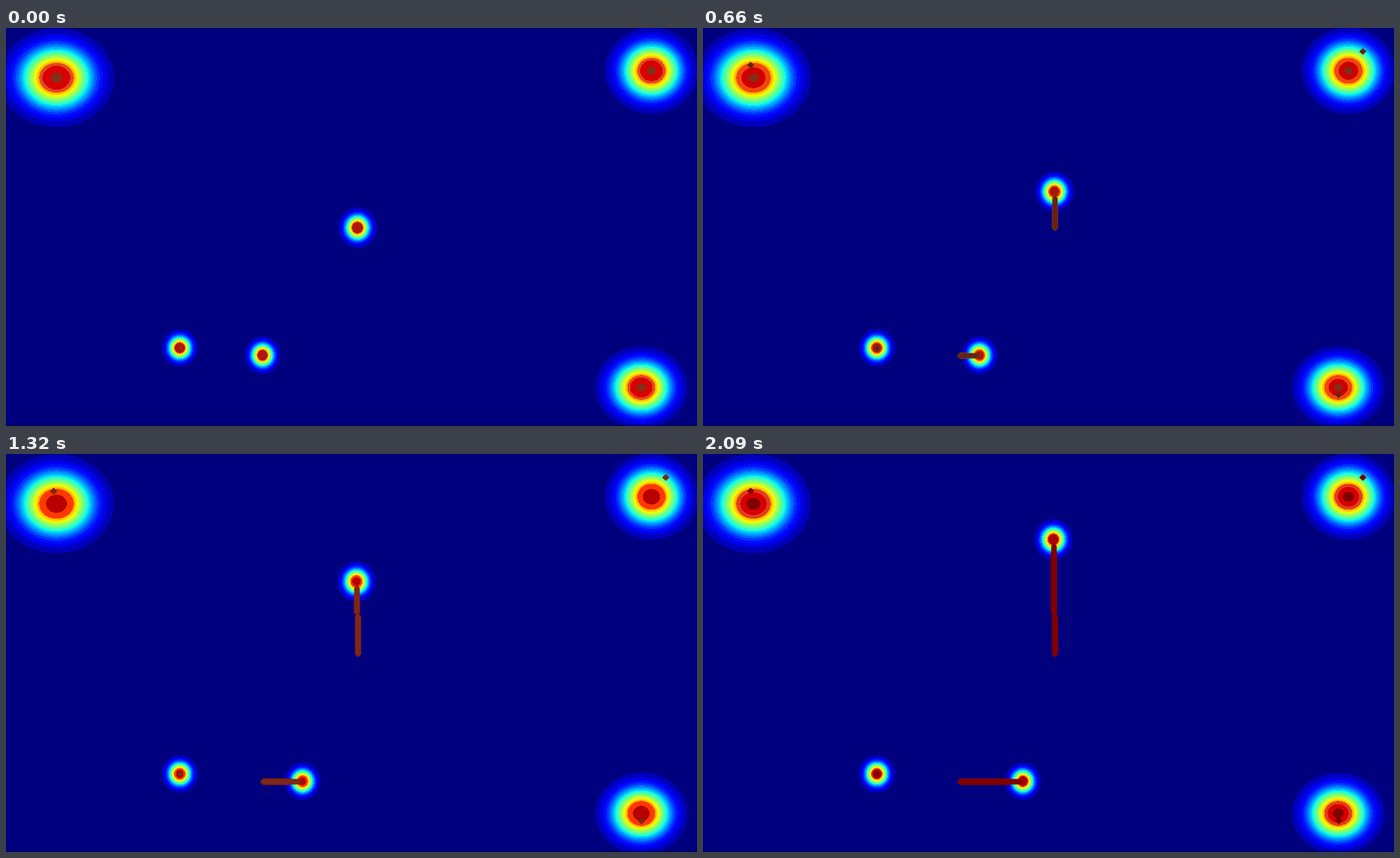
A matplotlib script for the animation above (2200 ms loop, 986 px wide and 568 px high).

```python
import numpy as np
import matplotlib.pyplot as plt
from matplotlib.animation import FuncAnimation
from matplotlib.colors import to_rgb
from matplotlib.patches import Polygon

W, H, DPI = 986, 568, 100
FRAMES, STEP_MS = 20, 110
BANDS = 24
SPREAD = np.sqrt(2 * np.log(BANDS))  # radius of the lowest band, in sigmas

# x, y, rx, ry
HOTSPOTS = [(72, 71, 82, 70.5), (921, 61, 66.5, 61.5), (906.5, 513, 66, 58.5)]
STILL = (248, 456.5, 26, 27)
MARKS = [(68, 53), (941.5, 33.5), (907, 523.5), (248.5, 457)]

# time step, core, core level, red, red level, orange, trail, trail edge
TONES = [
    (0, "#80301c", .971, "#d80000", .832, "#e64820", "#7a3018", "#7a3018"),
    (4, "#80301c", .980, "#d00000", .876, "#ff4600", "#733018", "#733018"),
    (9, "#78321a", .976, "#c80000", .860, "#e24820", "#501010", "#702c18"),
    (12, "#b80000", .950, "#b80000", .900, "#ff3800", "#7d2818", "#801c10"),
    (14, "#5a1010", .988, "#c80000", .876, "#ff3800", "#5a1010", "#5a1010"),
    (17, "#800000", .955, "#dc0000", .848, "#ff4600", "#800000", "#800000"),
    (19, "#800000", .955, "#d60000", .848, "#e23c1c", "#800000", "#800000"),
]


def flatten(row):
    return np.hstack([to_rgb(v) if isinstance(v, str) else v for v in row[1:]])


KEY_TIMES = [row[0] for row in TONES]
KEY_TONES = np.array([flatten(row) for row in TONES])


def tones_at(i):
    t = [np.interp(i, KEY_TIMES, col) for col in KEY_TONES.T]
    return t[:3], t[3], t[4:7], t[7], t[8:11], t[11:14], t[14:17]


yy, xx = np.mgrid[:H, :W] + 0.5
jet = plt.get_cmap("jet")


def bell(x, y, rx, ry):
    r2 = ((xx - x) / rx) ** 2 + ((yy - y) / ry) ** 2
    return np.exp(-0.5 * SPREAD ** 2 * r2)


def peak(spots):
    return np.max([bell(*s) for s in spots], axis=0)


big = peak(HOTSPOTS)
still = bell(*STILL)


def climber(i):
    y = 285 - 8.58 * i
    return (501.5 if y > 228 else 500), y


def runner(i):
    return 366 + 4.76 * i, 467


def heat(i, tones):
    core, core_at, red, red_at, orange = tones[:5]
    small = np.max([still, bell(*climber(i), 27.5, 29), bell(*runner(i), 25.5, 27)], axis=0)
    level = np.maximum(big, small)
    band = np.floor(level * BANDS)
    img = jet((band + 0.3) / BANDS)[..., :3]
    img[band < 1] = 0, 0, 0.5
    img[level > 0.75] = orange
    img[big > red_at] = red
    img[big > core_at] = core
    img[small > red_at - 0.03] = (np.array(core) + red) / 2
    img[-2:] = img[-2:] * 0.75
    return img


def bar(c, a, b, half, upright):
    """Bar along one axis with pointed ends."""
    tip = min(4, (b - a) / 2)
    pts = [(c, a), (c + half, a + tip), (c + half, b - tip),
           (c, b), (c - half, b - tip), (c - half, a + tip)]
    return pts if upright else [p[::-1] for p in pts]


def trails(i):
    shapes = [bar(x, y - 4.8, y + 4.8, 4.6, True) for x, y in MARKS]
    head = climber(i)[1]
    for top, half in ((head + 5, 3.9), (head + 14, 4.5)):
        if top < 282:
            shapes.append(bar(502.3, max(top, 227), 290, half, True))
        if top < 222:
            shapes.append(bar(500.8, top, 231, half, True))
    right = runner(i)[0] + 1
    for end, half in ((right, 3.9), (right - 15, 4.8)):
        if end > 370:
            shapes.append(bar(467.7, 362.5, end, half, False))
    return shapes


fig = plt.figure(figsize=(W / DPI, H / DPI), dpi=DPI)
ax = fig.add_axes([0, 0, 1, 1])
ax.axis("off")
picture = ax.imshow(np.zeros((H, W, 3)), extent=(0, W, H, 0),
                    interpolation="nearest", aspect="auto")
ax.set(xlim=(0, W), ylim=(H, 0))


def draw(i):
    tones = tones_at(i)
    picture.set_data(np.clip(heat(i, tones), 0, 1))
    for patch in list(ax.patches):
        patch.remove()
    if i > 0:
        fill, edge = tones[5:]
        shapes = trails(i)
        # Edges first, so overlapping bars share one outline
        for pts in shapes:
            ax.add_patch(Polygon(pts, fc=edge, ec="none"))
        for pts in shapes:
            pts = np.array(pts)
            mid = (pts.min(0) + pts.max(0)) / 2
            size = (pts.max(0) - pts.min(0)) / 2
            inner = mid + (pts - mid) * (size - 1.2) / size
            ax.add_patch(Polygon(inner, fc=fill, ec="none"))
    return [picture, *ax.patches]


anim = FuncAnimation(fig, draw, frames=FRAMES, interval=STEP_MS,
                     repeat=True, repeat_delay=0, blit=False)
plt.show()
```
